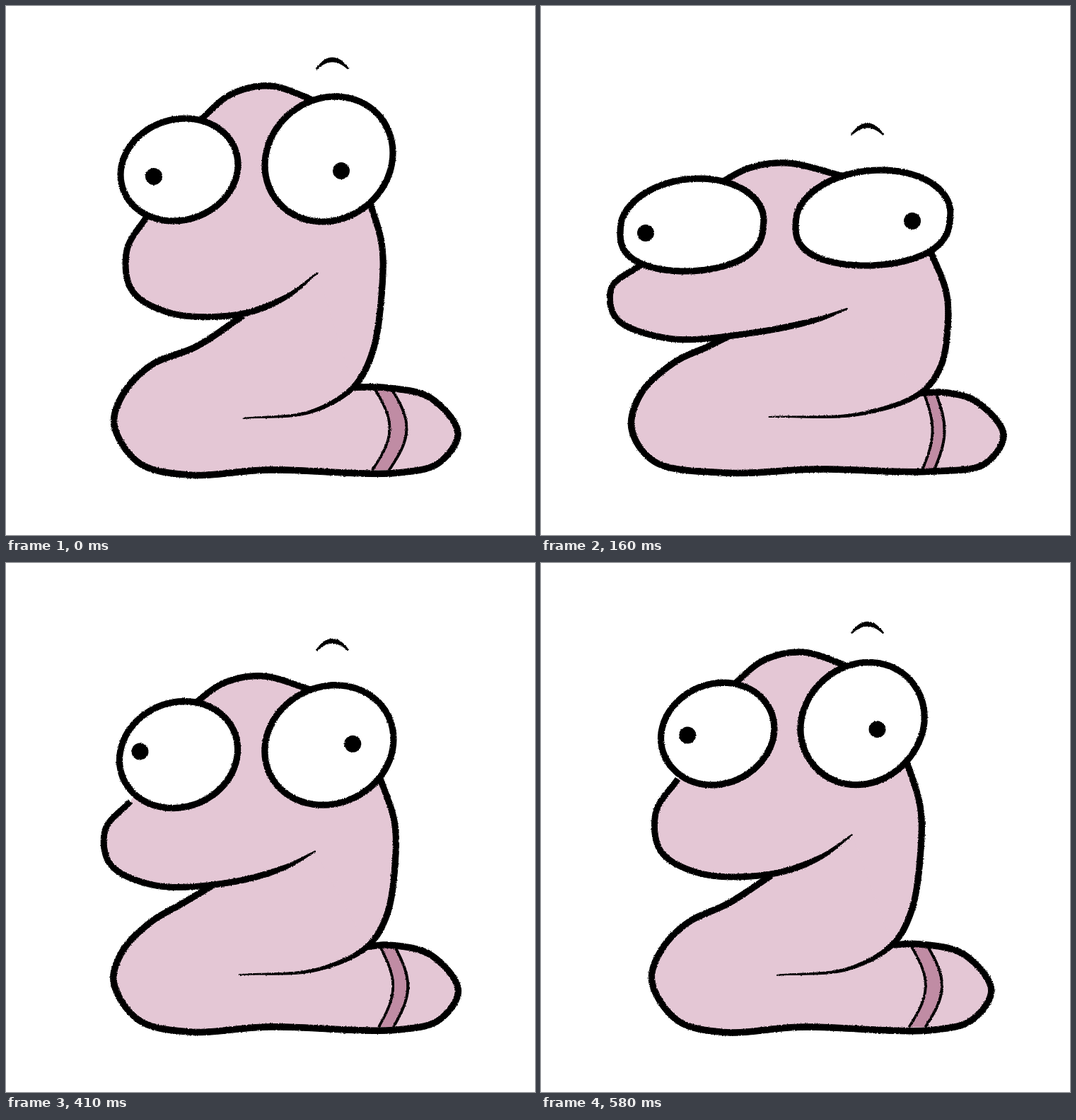
These frames come from a looping animation (748 by 748 pixels, 660 ms). An HTML page:

```html
<!DOCTYPE html>
<html lang="en">
<head>
<meta charset="utf-8">
<title>Bouncing worm</title>
<style>
  html, body { margin: 0; width: 100%; height: 100%; overflow: hidden; background: #fff; }
  svg { display: block; width: 100%; height: 100%; }
</style>
</head>
<body>
<svg viewBox="0 0 748 748">
  <filter id="rough" filterUnits="userSpaceOnUse" x="0" y="0" width="748" height="748" color-interpolation-filters="sRGB">
    <feTurbulence type="fractalNoise" baseFrequency=".6" numOctaves="1" seed="4"/>
    <feDisplacementMap in="SourceGraphic" scale="3" xChannelSelector="R" yChannelSelector="G"/>
  </filter>
  <g id="worm" filter="url(#rough)" stroke-linejoin="round"></g>
</svg>
<script>
const INK = '#000', PINK = '#e4c7d5', ROSE = '#c08ca4';
const LOOP = 660, STEPS = [0, 80, 160, 250, 330, 410, 500, 580];

// How far each part has moved from stretched (0) to squashed (1).
const keys = [
  { at: 0, head: 0, jaw: 0, spread: 0, gaze: 0, brow: 0, lean: 0 },
  { at: 80, head: .75, jaw: .9, spread: .52, gaze: .7, brow: .54, lean: 12 },
  { at: 160, head: 1, jaw: 1, spread: 1, gaze: 1, brow: 1, lean: 0 },
  { at: 330, head: .89, jaw: 1.06, spread: .35, gaze: .7, brow: .75, lean: 13 },
  { at: 410, head: .43, jaw: .6, spread: .03, gaze: .32, brow: .37, lean: 0 },
  { at: 580, head: .12, jaw: .14, spread: -.15, gaze: .03, brow: .11, lean: 0 }
];

// Centre lines: key points when stretched, then when squashed.
const lines = {
  top: ['268,168 318,125 373,113 440,135', '245,255 295,229 348,222 432,242'],
  back: ['512,270 531,335 532,395 518,490 491,539 430,574 335,583',
    '548,340 573,405 575,455 565,510 537,547 450,577 322,581'],
  rump: ['540,540 600,554 639,604 612,646 555,660 370,656 258,663 188,646 153,592 166,548 205,508',
    '575,547 615,559 654,606 628,647 555,658 390,655 260,660 160,644 128,597 142,547 190,503'],
  lap: ['270,481 335,438', '235,482 265,467'],
  muzzle: ['200,296 171,345 178,402 232,434 330,436 395,412 441,377',
    '143,365 100,398 106,441 180,470 300,462 392,443 433,428']
};
const JOINT = 4; // back point where the tail begins

const lerp = (a, b, t) => a + (b - a) * t;
const points = text => text.split(' ').map(p => p.split(',').map(Number));

function blend(name, kx, ky = kx) {
  const [from, to] = lines[name].map(points);
  return from.map(([x, y], i) => [lerp(x, to[i][0], kx), lerp(y, to[i][1], ky)]);
}

function poseAt(t) {
  const next = keys.findIndex(key => key.at > t);
  if (next < 0) return keys[keys.length - 1];
  const a = keys[next - 1], b = keys[next], k = (t - a.at) / (b.at - a.at);
  return Object.fromEntries(Object.keys(a).map(name => [name, lerp(a[name], b[name], k)]));
}

// Centripetal Catmull-Rom curve, sampled to a polyline.
function curve(pts) {
  const n = pts.length, out = [];
  const mirror = (p, q) => [2 * p[0] - q[0], 2 * p[1] - q[1]];
  const all = [mirror(pts[0], pts[1]), ...pts, mirror(pts[n - 1], pts[n - 2])];
  const gap = (p, q) => Math.sqrt(Math.hypot(p[0] - q[0], p[1] - q[1])) || 1;
  for (let i = 0; i < n - 1; i++) {
    const [a, b, c, d] = all.slice(i, i + 4);
    const ab = gap(a, b), bc = gap(b, c), cd = gap(c, d);
    for (let t = 0; t < 1; t += 1 / 16) {
      const t2 = t * t, t3 = t2 * t;
      out.push([0, 1].map(k => {
        const m1 = bc * ((b[k] - a[k]) / ab - (c[k] - a[k]) / (ab + bc)) + c[k] - b[k];
        const m2 = bc * ((d[k] - c[k]) / cd - (d[k] - b[k]) / (bc + cd)) + c[k] - b[k];
        return (2 * t3 - 3 * t2 + 1) * b[k] + (t3 - 2 * t2 + t) * m1
          + (3 * t2 - 2 * t3) * c[k] + (t3 - t2) * m2;
      }));
    }
  }
  return [...out, pts[n - 1]];
}

const trace = (n, point) => Array.from({ length: n + 1 }, (_, i) => point(i / n));
const reversed = pts => pts.slice().reverse();
const outline = pts => 'M' + pts.map(p => p.map(v => v.toFixed(1)).join(' ')).join('L') + 'Z';

// Ribbon along a polyline; width(u) is its thickness at u = 0..1.
function brush(pts, width) {
  const left = [], right = [], last = pts.length - 1;
  pts.forEach(([x, y], i) => {
    const a = pts[Math.max(0, i - 1)], b = pts[Math.min(last, i + 1)];
    const dx = b[0] - a[0], dy = b[1] - a[1];
    const k = (width(i / last) - 1) / 2 / (Math.hypot(dx, dy) || 1);
    left.push([x - dy * k, y + dx * k]);
    right.push([x + dy * k, y - dx * k]);
  });
  return outline([...left, ...reversed(right)]);
}

// Tilted oval whose lower half turns boxy when squashed.
function eyeball(left, right, top, bottom, squash) {
  return trace(72, u => {
    const a = u * 2 * Math.PI, s = Math.sin(a - .1);
    const h = s > 0 ? s ** (1 - .3 * squash) : s;
    return [lerp(left, right, (1 + Math.cos(a)) / 2), lerp(top, bottom, (1 + h) / 2)];
  });
}

const bandEdge = (x, bulge, head) => trace(16, u =>
  [x - 3 * u + bulge * Math.sin(Math.PI * u), lerp(541 + 8 * head, 656, u)]);

const even = w => () => w;
const taper = (from, w, end) => u => u < from ? w : lerp(w, end, (u - from) / (1 - from));
const widths = {
  bandL: even(3.8), bandR: even(4), tail: even(9.5), back: taper(.62, 9.2, 2),
  muzzle: taper(.78, 9, 2.5), top: even(9.2),
  brow: u => 2.5 + 4.5 * Math.sin(Math.PI * u)
};

const worm = document.getElementById('worm');
function shape(tag, fill, stroke) {
  const node = document.createElementNS('http://www.w3.org/2000/svg', tag);
  node.setAttribute('fill', fill);
  if (stroke) {
    node.setAttribute('stroke', INK);
    node.setAttribute('stroke-width', stroke);
  }
  return worm.appendChild(node);
}
const el = {};
for (const name of ['head', 'body']) el[name] = shape('path', PINK);
el.band = shape('path', ROSE);
for (const name in widths) el[name] = shape('path', INK, 1);
for (const name of ['eyeL', 'eyeR']) el[name] = shape('path', '#fff', 9.2);
for (const name of ['pupilL', 'pupilR']) el[name] = shape('circle', INK);

function draw({ head, jaw, spread, gaze, brow, lean }) {
  const spine = blend('back', head);
  const bandX = 545 + 14 * head, bulge = 23 - 10 * head;
  const line = {
    top: curve(blend('top', head)),
    back: curve(spine),
    tail: curve([spine[JOINT], ...blend('rump', spread), ...blend('lap', jaw)]),
    muzzle: curve(blend('muzzle', head, jaw)),
    brow: trace(16, u => [439 + 45 * u, 76 + 93 * brow + 13 * (2 * u - 1) ** 2]),
    bandL: bandEdge(bandX - 24 + 7 * head, bulge, head),
    bandR: bandEdge(bandX, bulge, head)
  };
  const put = (name, d) => el[name].setAttribute('d', d);
  for (const name in line) put(name, brush(line[name], widths[name]));
  put('head', outline([...line.top, ...line.back, ...reversed(line.muzzle)]));
  put('body', outline([...line.tail, line.muzzle[line.muzzle.length - 1]]));
  put('band', outline([...line.bandL, ...reversed(line.bandR)]));

  put('eyeL', outline(eyeball(lerp(162, 112, spread), lerp(328, 315, spread),
    lerp(159, 244, head), lerp(304, 375, jaw), spread)));
  put('eyeR', outline(eyeball(lerp(366, 360, spread), lerp(547, 579, spread),
    lerp(128, 232, head) - lean, lerp(305, 367, jaw), spread)));

  const dot = (name, cx, cy) => Object.entries({ cx, cy, r: 12 })
    .forEach(([key, value]) => el[name].setAttribute(key, value));
  dot('pupilL', lerp(209, 148, gaze), lerp(241, 321, gaze));
  dot('pupilR', lerp(474, 525, gaze), lerp(233, 304, gaze));
}

const start = performance.now();
let shown;
function tick() {
  const t = (performance.now() - start) % LOOP;
  const step = STEPS.filter(at => at <= t).pop();
  if (step !== shown) draw(poseAt(shown = step));
  requestAnimationFrame(tick);
}
tick();
</script>
</body>
</html>
```
